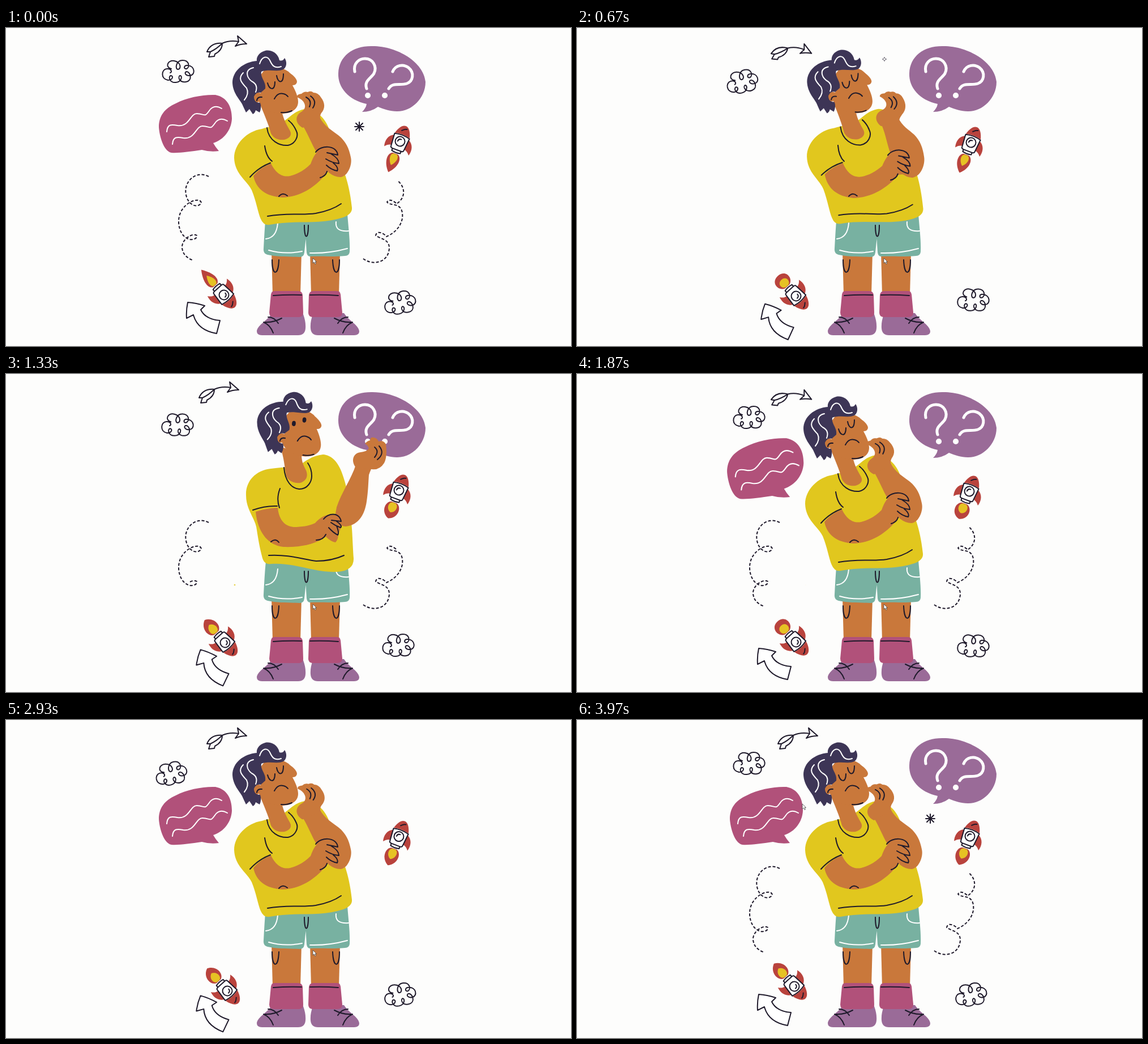
An HTML page for the animation above (4.01 s loop, 998 px wide and 561 px high).

```html
<!DOCTYPE html>
<html lang="en">
<head>
<meta charset="utf-8">
<title>Thinking</title>
<style>
html, body { margin: 0; width: 100%; height: 100%; overflow: hidden; background: #fdfdfc; }
svg { display: block; width: 100%; height: 100%; }
.l, .w { fill: none; stroke: #1f1a2b; stroke-width: 2; stroke-linecap: round; stroke-linejoin: round; }
.w { stroke: #fff; }
.swirl { stroke-linecap: butt; }
.o { fill: #fff; stroke: #1f1a2b; stroke-width: 2; stroke-linejoin: round; }
.skin { fill: #c9783b; }
.shirt { fill: #e1c71e; }
.teal { fill: #78b1a1; }
.pink { fill: #b1517a; }
.purple { fill: #9a6b98; }
.hair { fill: #3d3556; }
.red { fill: #b9433d; }
</style>
</head>
<body>
<svg viewBox="0 0 998 561">
  <defs>
    <path id="cloud" class="l" d="M-12 -5C-24 -8 -18 -21 -7 -19C5 -17 6 -5 0 -4C-6 -4 -4 -20 8 -20C20 -20 21 -8 15 -5C9 -4 10 -12 17 -11C30 -10 31 6 21 7C13 8 10 1 15 0C22 0 26 16 14 18C3 20 -1 10 3 7C8 6 7 18 -4 19C-15 20 -18 9 -13 7C-8 7 -9 15 -18 15C-31 13 -30 -4 -20 -5C-12 -6 -10 1 -14 2"/>
    <g id="ship">
      <path class="red" d="M-13 -8C-24 -3 -26 8 -23 18Q-18 11 -11 11ZM13 -8C24 -3 26 8 23 18Q18 11 11 11Z"/>
      <path class="o" d="M-8 15H8V20Q0 22 -8 20Z"/>
      <path class="o" d="M-14 -10Q0 -14 14 -10L12 13Q12 16 8 16H-8Q-12 16 -12 13Z"/>
      <path class="red" d="M-14 -11C-11 -22 -6 -29 0 -29S11 -22 14 -11Q0 -15 -14 -11Z"/>
      <path class="l" d="M-4 -19Q1 -24 4 -24"/>
      <circle class="o" r="8.5"/>
      <path class="l" stroke-width="1" d="M-4 1Q-4 -4 1 -4"/>
    </g>
    <g id="leg">
      <path class="skin" d="M469 395H522L520 470H471Z"/>
      <path class="l" d="M470 409C470 438 481 438 482 409"/>
    </g>
    <g id="shoe">
      <path class="purple" d="M470 503C462 516 444 524 443 535Q443 542 452 542H516Q528 542 529 530C530 518 526 508 524 502Z"/>
      <path class="l" d="M455 519Q467 524 472 538M458 519Q472 520 487 512M463 510Q474 510 481 521"/>
    </g>
    <g id="sock">
      <path class="pink" d="M474 464H516Q523 464 524 471L525 502Q525 509 518 510H474Q465 510 465 502L468 470Q469 464 474 464Z"/>
      <path class="l" d="M472 472Q497 470 522 471"/>
    </g>
  </defs>

  <g id="talk">
    <path class="pink" d="M300 133C320 122 350 117 370 118C390 122 399 138 399 160C398 180 385 197 366 203Q370 210 376 217Q360 219 346 215C325 218 305 221 292 220C278 217 271 190 270 175C270 155 280 142 300 133Z"/>
    <path id="wave" class="w" d="M284 183C285 169 293 170 303 172C324 175 325 151 337 151C351 151 350 159 359 146Q367 134 381 142"/>
    <use href="#wave" x="10" y="22"/>
  </g>
  <g id="ask">
    <path class="purple" d="M587 80C588 50 612 32 645 32C690 31 738 60 741 95C741 125 715 148 690 147C678 147 667 143 657 139Q645 148 629 148Q636 141 637 134C605 127 586 105 587 80Z"/>
    <path class="w" style="stroke-width:5" d="M616 77C613 62 624 54 634 54C648 54 656 68 650 80C645 89 632 93 637 107M683 77C688 65 702 63 711 70C722 79 719 94 708 98C696 102 683 95 676 107"/>
    <path class="w" style="stroke-width:10" d="M639 119h.1M669 119h.1"/>
  </g>

  <path class="l swirl" d="M358 262C335 250 313 272 318 294C321 312 338 319 345 309C345 300 325 302 313 318C299 335 305 362 318 370C328 377 339 371 337 366C330 361 310 372 311 388Q313 404 331 410"/>
  <path class="l swirl" d="M631 407C648 420 676 414 677 388C677 372 660 372 653 366C655 356 668 362 672 368C695 358 704 338 699 322C694 308 678 314 673 307C678 299 688 308 690 310C706 300 707 280 689 267"/>

  <g id="cloudL"><use href="#cloud"/></g>
  <g id="cloudR"><use href="#cloud"/></g>
  <g id="dart">
    <path class="l" d="M-35 9C-30 -3 -20 -7 -8 -6C-8 5 -15 10 -21 13L-22 17L-32 18L-29 9ZM-29 9Q-18 4 -8 -6Q5 -12 21 -9M19 -19L35 -5Q24 -5 15 -1L21 -9Z"/>
  </g>
  <g id="arrow">
    <path class="o" d="M-27 -27Q-12 -26 3 -21L-4 -14Q4 3 30 5L24 28Q-10 22 -17 -5L-29 1Q-30 -13 -27 -27Z"/>
  </g>
  <g class="rocket"></g>
  <g class="rocket"></g>

  <use href="#leg"/><use href="#leg" transform="matrix(-1 0 0 1 1059 0)"/>
  <use href="#shoe"/><use href="#shoe" transform="matrix(-1 0 0 1 1067 0)"/>
  <use href="#sock"/><use href="#sock" transform="matrix(-1 0 0 1 1059 0)"/>
  <path class="teal" d="M459 330L603 328C605 355 608 375 607 395Q606 402 599 402C575 404 555 402 537 403Q532 403 531 396L529.5 372L527 396Q526 404 519 404C500 403 480 404 462 400Q454 398 455 389C456 370 457 350 459 330Z"/>
  <path class="w" d="M464 392Q492 400 523 394M537 397Q570 398 603 389M480 344Q478 370 459 372M583 342Q581 360 605 358"/>
  <path class="l" d="M527 348C527 374 534 374 534 348"/>

  <path class="shirt" d="M452 178C425 182 403 205 403 229C404 258 425 268 434 286C442 305 445 326 450 337Q455 349 466 347C510 338 555 348 596 334Q612 328 611 317C608 290 604 275 600 262C588 225 578 195 569 174C561 155 545 144 528 143C510 146 502 157 490 165C480 172 465 174 452 178Z"
    data-to="M468 167C440 170 423 190 424 214C424 240 441 255 443 275C446 295 449 310 452 321Q455 337 468 335C510 332 545 351 585 349Q615 347 614 325C612 295 612 280 610 262C608 235 604 205 596 182C588 155 575 143 560 142C540 144 527 155 517 162C500 164 485 165 468 167Z"/>
  <path class="skin" d="M447 130C455 150 464 170 468 186C474 197 484 198 492 197C502 194 506 188 501 180C494 168 489 158 487 145Z"
    data-to="M484 128C491 145 492 165 495 180C500 190 510 193 520 192C531 188 534 180 530 170C525 160 522 155 522 140Z"/>
  <path class="l" d="M461 176C464 200 484 208 498 207C512 204 517 190 513 182Q508 170 499 163"
    data-to="M491 165C493 190 505 202 518 203C533 203 540 190 540 180Q540 167 533 157"/>
  <path class="l" d="M462 332C500 325 520 331 547 327Q575 322 592 310"
    data-to="M464 320C500 318 525 327 548 330Q575 330 597 320"/>

  <g id="head">
    <path class="skin" d="M449 84L458 72C475 66 495 72 501 79C508 84 514 90 514 95Q513 101 506 101C512 112 516 122 516 130C516 143 505 150 490 151C465 152 452 140 447 130C440 134 436 126 438 119Q442 112 450 115Z"/>
    <path class="hair" d="M443 58C420 60 400 75 400 97C401 115 412 125 417 134Q421 143 424 149L430 143L436 152Q440 150 441 145L448 149Q452 140 449 132Q438 132 438 121Q442 112 450 114L458 107C460 95 449 88 451 77C465 72 480 78 490 73C497 68 496 58 492 53Q489 59 483 57C480 42 466 38 458 40C446 43 442 52 443 58Z"/>
    <path class="w" d="M419 79C408 90 418 98 425 106Q430 116 421 127M437 70C420 74 426 88 434 94Q446 100 441 113M448 63C452 50 461 48 466 57C470 66 474 72 486 68"/>
    <path class="l" d="M474 125Q480 113 490 116Q495 117 498 121M486 149Q497 150 505 146M443 128Q444 121 452 122"/>
    <path id="shut" class="l" d="M462 97C465 109 475 112 475 95M478 84C480 97 490 100 490 81"/>
    <g id="open" fill="#1f1a2b"><ellipse cx="465" cy="95" rx="3.4" ry="4.6"/><ellipse cx="483" cy="87" rx="3.4" ry="4.6"/></g>
  </g>

  <path class="skin" d="M524 172C535 190 540 205 549 220L570 255Q582 264 592 263C605 260 612 240 609 228C606 212 600 200 588 190C577 181 562 174 554 157Z"
    data-to="M618 160C610 185 592 210 584 235L581 252Q584 268 600 269C625 266 634 245 637 225C640 205 640 190 641 178C643 172 645 168 646 165Z"/>
  <g id="hand">
    <path class="skin" d="M524 176C510 168 511 155 520 149C527 145 530 140 527 133Q524 126 514 122Q513 117 522 116Q527 111 533 113Q539 110 543 114Q551 114 556 122C564 132 564 142 557 150Q554 154 555 162Z"
      data-to="M618 165C610 155 612 143 622 139C630 137 638 137 641 131Q638 124 634 123Q638 118 643 117Q644 111 649 112Q656 113 658 119Q667 116 671 124C673 136 672 150 668 157Q660 170 646 168Z"/>
    <path class="l" d="M530 122Q541 128 536 139M538 120Q550 129 542 141"
      data-to="M651 129Q660 136 651 147M659 127Q670 140 656 151"/>
  </g>
  <path class="skin" d="M437 261Q448 247 468 239C476 256 488 264 502 261C518 257 530 248 538 240C543 226 549 216 560 211Q574 207 585 215Q588 222 586 228L588 243Q587 252 580 253Q570 250 566 256C550 278 520 299 488 299C460 297 442 285 437 261Z"
    data-to="M441 243Q458 237 480 236C482 255 490 268 508 270C522 270 535 268 546 263C552 256 560 250 570 248Q585 245 592 257Q594 265 592 270L587 283Q587 292 582 297Q574 296 565 287C545 302 515 306 490 305C460 302 444 275 441 243Z"/>
  <path class="l" d="M547 219C556 206 584 206 586 224L567 220M574 222Q588 230 588 239Q576 238 565 231M578 238Q588 246 585 252Q574 250 566 242M567 253Q565 261 555 264"
    data-to="M561 256C568 246 588 242 592 260L575 258M584 260Q595 268 591 271Q582 268 574 262M584 268Q589 281 586 284Q578 280 570 271M565 283Q560 293 548 293"/>
  <path class="l" d="M457 208Q460 228 470 235M431 263Q446 246 467 238M482 297Q489 289 497 296"
    data-to="M484 202Q477 220 483 236M436 240Q458 232 479 233M468 296Q476 289 482 297"/>

  <g id="sparks"></g>
  <path id="cursor" d="M0 0V9L2.200 7L4 10.500L5.500 9.700L4 6.500H6.500Z" fill="#fff" stroke="#444" stroke-width=".8"/>
</svg>
<script>
const LOOP = 4010;
const $ = id => document.getElementById(id);
const all = q => [...document.querySelectorAll(q)];
const clamp = x => Math.max(0, Math.min(1, x));
const ramp = (t, start, length) => clamp((t - start) / length);
const smooth = x => x * x * (3 - 2 * x);
const back = x => 1 + 3.1 * (x - 1) ** 3 + 2.1 * (x - 1) ** 2;
const move = (el, x, y, rest = '') => el.setAttribute('transform', `translate(${x} ${y}) ${rest}`);

// Linear track through values at shared key times.
const KEYS = [0, 670, 1330, 1870, 2470, 3400, 3970];
function track(t, values) {
  let i = 0;
  while (i < KEYS.length - 2 && t >= KEYS[i + 1]) i++;
  return values[i] + (values[i + 1] - values[i]) * ramp(t, KEYS[i], KEYS[i + 1] - KEYS[i]);
}

const morphs = all('[data-to]').map(el => ({
  el, from: el.getAttribute('d'), to: el.dataset.to.match(/-?\d+/g)
}));

// Doodles hop between a few stances: [dx, dy, turn].
const hops = [
  { id: 'cloudL', x: 304, y: 77, order: '0310321023013210', at: [[0, 0, 0], [-12, 18, -11], [-1, 13, 3], [-8, 6, -9]] },
  { id: 'cloudR', x: 696, y: 485, order: '0112221122001220', at: [[0, 0, -8], [4, -5, 3], [-3, -6, 0]] },
  { id: 'dart', x: 390, y: 33, order: '0011220112203330', at: [[0, 0, 0], [-11, 10, 11], [-14, 0, 0], [-6, -5, 0]] },
  { id: 'arrow', x: 348, y: 511, order: '0011220011223330', at: [[0, 0, 0], [6, 7, 10], [17, 7, 11], [8, -5, 10]] }
];

const rockets = [
  { x: [696, 696, 694, 693, 693, 695, 694], y: [200, 202, 205, 207, 207, 204, 205], turn: 21,
    flame: [58, 57, 53, 52, 49, 60, 54] },
  { x: [385, 387, 387, 387, 392, 390, 384], y: [471, 473, 474, 473, 480, 476, 470], turn: 138,
    flame: [60, 48, 54, 49, 49, 58, 54] }
];
all('.rocket').forEach((el, i) => {
  el.innerHTML = '<path class="red"/><path fill="#e6c224" transform="translate(0 10) scale(.6)"/><use href="#ship"/>';
  rockets[i].el = el;
});
function flame(len) {
  const round = clamp((60 - len) / 11), w = 13 + 5 * round;
  const y = 23 + (len - 23) * (.5 + .5 * round);
  return `M-5 23C${-w} 27 ${-w} ${y} 0 ${len}C${w} ${y} ${w} 27 5 23Z`;
}

const STAR = 'M0 -10.5Q2 -2 10.5 0Q2 2 0 10.5Q-2 2 -10.5 0Q-2 -2 0 -10.5Z';
const BURST = 'M0 -8V8M-8 0H8M-6 -6L6 6M6 -6L-6 6';
const sparks = [
  [624, 174, 'l', BURST, 3700, 600], [543, 55, 'o', STAR, 630, 550],
  [404, 372, 'shirt', STAR, 1310, 565], [628, 443, 'o', STAR, 2250, 500],
  [514, 24, 'shirt', STAR, 3150, 500]
];
$('sparks').innerHTML = sparks.map(s => `<path class="${s[2]}" d="${s[3]}"/>`).join('');

const swirls = all('.swirl').map(el => ({ el, len: el.getTotalLength() }));
function drawSwirl({ el, len }, from, to) {
  const a = Math.round(len * from / 8), b = Math.round(len * to / 8);
  el.style.display = b > a ? '' : 'none';
  el.setAttribute('stroke-dasharray', `0 ${a * 8} ` + '5 3 '.repeat(Math.max(0, b - a)) + '0 999');
}

function bubble(id, x, y, scale) {
  $(id).style.display = scale > 0 ? '' : 'none';
  move($(id), x, y, `scale(${scale}) translate(${-x} ${-y})`);
}

function render(t) {
  const pose = smooth(ramp(t, 560, 460)) - smooth(ramp(t, 1400, 440));
  for (const { el, from, to } of morphs) {
    let i = 0;
    el.setAttribute('d', from.replace(/-?\d+/g, n => +n + (to[i++] - n) * pose));
  }
  move($('head'), 43 * pose, -8 * pose, `rotate(${5 * pose} 460 100)`);
  $('shut').style.display = pose > .5 ? 'none' : '';
  $('open').style.display = pose > .5 ? '' : 'none';
  $('hand').setAttribute('transform',
    `rotate(${track(t, [0, 4, 0, -4, -2, 5, -4])} ${540 + 92 * pose} 166)`);

  bubble('talk', 372, 216, t < 1000 ? back(1 - ramp(t, 50, 450)) : back(ramp(t, 1500, 450)));
  bubble('ask', 636, 146, t < 2900 ? back(1 - ramp(t, 1950, 450)) : back(ramp(t, 3400, 450)));

  const half = t % (LOOP / 2);
  const erased = ramp(half, 392, 220), drawn = ramp(half, 1150, 225);
  for (const s of swirls) half < 900 ? drawSwirl(s, erased, 1) : drawSwirl(s, 0, drawn);

  for (const h of hops) {
    const [dx, dy, turn] = h.at[h.order[Math.floor(t / LOOP * 16)]];
    move($(h.id), h.x + dx, h.y + dy, `rotate(${turn})`);
  }
  for (const r of rockets) {
    move(r.el, track(t, r.x), track(t, r.y), `rotate(${r.turn})`);
    const d = flame(track(t, r.flame));
    r.el.children[0].setAttribute('d', d);
    r.el.children[1].setAttribute('d', d);
  }
  sparks.forEach(([x, y, , , start, life], i) => {
    const age = (t - start + LOOP) % LOOP;
    const scale = clamp(Math.min(age, life - age) / 120);
    const el = $('sparks').children[i];
    el.style.display = scale ? '' : 'none';
    move(el, x, y, `scale(${scale})`);
  });

  const glide = ramp(t, 3345, 625);
  move($('cursor'), 542 - 144 * glide, 406 - 258 * glide);
}

const begin = performance.now();
function tick() {
  render((performance.now() - begin) % LOOP);
  requestAnimationFrame(tick);
}
tick();
</script>
</body>
</html>
```
